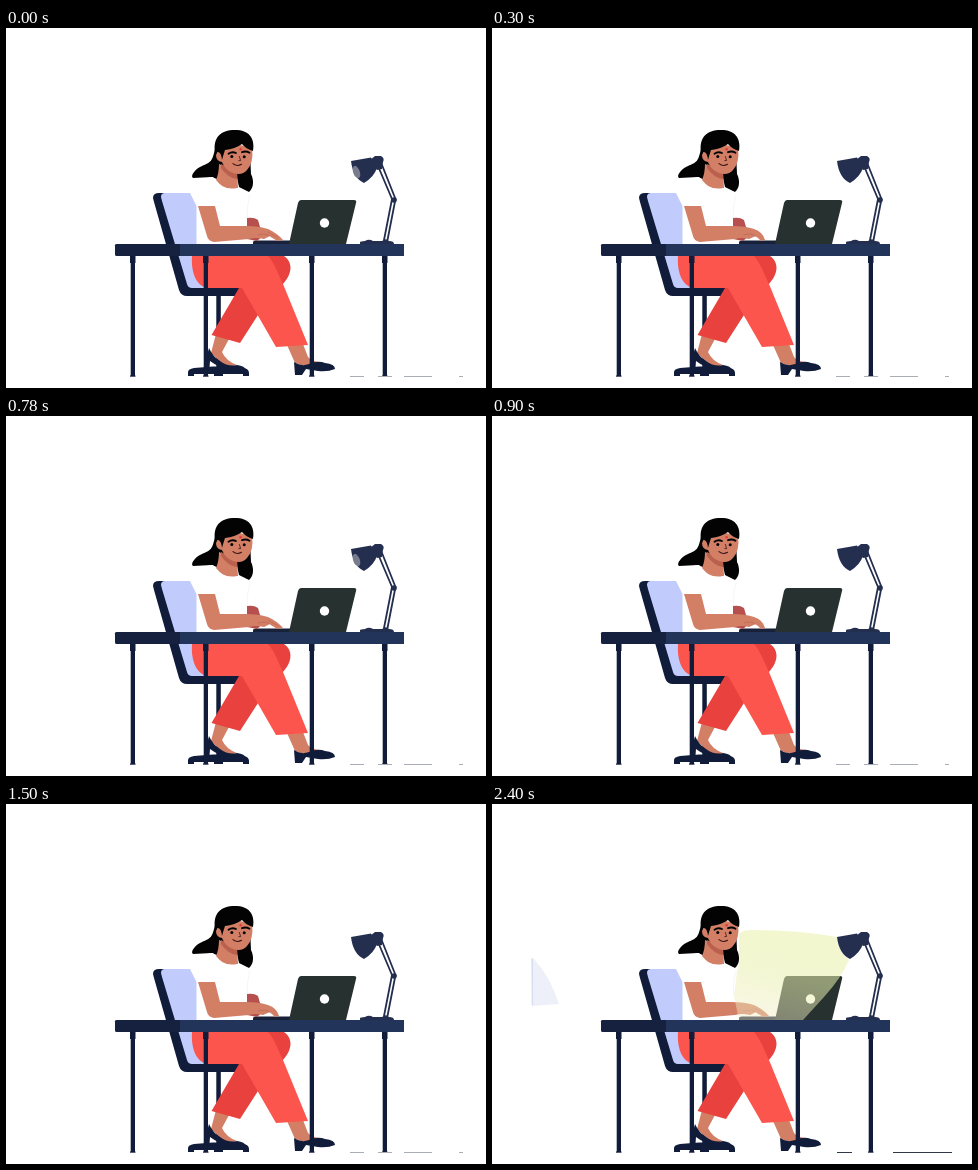
Write an HTML page with a canvas that moves like this. It is 480x360 px and loops after 2800 ms.

```html
<!DOCTYPE html>
<html lang="en">
<head>
<meta charset="utf-8">
<title>Working at a desk</title>
<style>
html, body { margin: 0; width: 100%; height: 100%; overflow: hidden; background: #fff; }
canvas { display: block; width: 480px; height: 360px; }
</style>
</head>
<body>
<canvas id="stage" width="480" height="360"></canvas>
<script>
const ctx = document.getElementById('stage').getContext('2d');
const LOOP = 2800, STEP = 300, LAMP_ON = 1800;
const navy = '#101c39', steel = '#242f50', skin = '#d37f66', shade = '#b9604f', black = '#030304';

function fill(path, color) {
  ctx.fillStyle = color;
  ctx.fill(new Path2D(path));
}

function line(path, color, width) {
  ctx.strokeStyle = color;
  ctx.lineWidth = width;
  ctx.lineCap = ctx.lineJoin = 'round';
  ctx.stroke(new Path2D(path));
}

function dot(x, y, r, color) {
  ctx.fillStyle = color;
  ctx.beginPath();
  ctx.arc(x, y, r, 0, Math.PI * 2);
  ctx.fill();
}

function box(x, y, w, h, color) {
  ctx.fillStyle = color;
  ctx.fillRect(x, y, w, h);
}

function gradient(x0, y0, x1, y1, ...colors) {
  const g = ctx.createLinearGradient(x0, y0, x1, y1);
  colors.forEach((c, i) => g.addColorStop(i / (colors.length - 1), c));
  return g;
}

function chair() {
  fill('M147 170Q147 165 153 165H186V228H187L192 260H240V268H181Q175 268 173 262L148 174Z', navy);
  fill('M155 169Q155 165 159 165H192V228L200 260H186Q182 260 181 256L156 173Z', '#c1ccfd');
  box(210.3, 268, 4.5, 72, navy);
  fill('M182 348V344Q182 341 188 340L207 338.5H218L238 340Q243 341 243 345V348H237V346H217V348H208V346H188V348Z', navy);
}

function legs() {
  fill('M210 306L223 311L216 324Q220 333 231 337L221 340L205 325Z', skin);
  fill('M281 317L297 316L302 329Q305 333 313 334L302 339L289 335Z', skin);
  fill('M255 228H278C287 234 287 246 276 257L252 287L234 315L205.5 307L233 260Z', '#e9413d');
  fill('M186 228H262C269 236 272 246 277 256L302 317L270 319L236 260H202C189 258 185 242 186 228Z', '#fb554d');
  fill('M203 320Q207 329 214 333Q222 339 231 337Q239 338 240 342H223Q212 339 204 333L203 346H201Q200 328 203 320Z', navy);
  fill('M288 334Q295 339 303 336Q312 332 319 335Q329 336 329 341Q322 344 312 343L300 341L296 347H289Z', navy);
}

function head() {
  fill('M209 121C206 134 205 134 196 138C189 141 184 148 187 150L206 149L213 152L231 150L233 159L243 164C248 160 248 152 245 146L244 124Z', black);
  fill('M213 136L231 143L232 160Q221 166 210 152Q213 145 213 136Z', skin);
  fill('M215 136L231 144L231 151Q222 150 215 140Z', shade);
  fill('M211 125Q213 117 230 116L246 120Q248 134 241 142Q236 148 227 145Q219 142 216 134Q210 133 210 127Z', skin);
  fill('M209 124C207 110 214 102 229 102C243 102 249 110 247 123Q240 121 236 116Q229 121 219 122Q217 128 216 132Q215 123 211 124Z', black);
  line('M222.5 125.8Q226 123.2 230 125M236 124.2Q240 122.6 243.5 124.8', black, 1.8);
  dot(225.8, 128.6, 1.5, black);
  dot(238.2, 128.8, 1.5, black);
  line('M233.4 128.5L234.6 132.6H232.8', '#3a1718', 0.8);
  line('M227 135.6Q231 139 235.5 136.3', '#3a1718', 1.2);
  dot(234.6, 121.2, 1.3, '#e8393b');
}

function torso() {
  fill('M187 150Q198 151 207 149Q216 163 231 160L242 164L245 168Q240 181 242 192L245 216H190.5V178L184 165Q181 152 187 150Z', '#fff');
  line('M244 167Q240 180 242 191', '#f2f2f4', 0.7);
}

function arms(reach, lit) {
  if (!lit) fill('M241 190Q248 189 252 192L254 199L258 207L251 213L241 211Z', '#b64f4e');
  const hand = reach
    ? 'H239Q253 198 262 201Q271 205 277 212L271 213L264 208L258 211'
    : 'H239Q254 198 262 201Q271 204 273 212L269 213L264 208L257 211';
  fill('M192 178H209L214 198' + hand + 'Q250 209 243 211L208 214Q202 213 201 208Z', skin);
  line(reach ? 'M252 207Q260 204 267 210M262 204L272 210' : 'M252 207Q259 204 265 209', shade, 0.6);
}

function laptop() {
  fill('M247 214.5Q247 212.5 250 212.5H284V216H247Z', '#172139');
  fill('M295 172H348Q351 172 350 175L340 216H283L292 175Q293 172 295 172Z', '#263130');
  dot(318.5, 195, 4.7, '#fff');
}

function desk() {
  for (const x of [124, 197, 303, 376]) {
    box(x, 228, 5.5, 7, navy);
    box(x + 0.7, 235, 4.3, 113, navy);
    box(x, 347.5, 5.5, 1.2, navy);
  }
  fill('M109 217.5Q109 216 111 216H398V228H111Q109 228 109 226Z', '#22345a');
  fill('M109 217.5Q109 216 111 216H174V228H111Q109 228 109 226Z', '#15213f');
}

function lamp(open) {
  line('M372 138L386 171L378 212M376 137L389.5 171L381.5 212', steel, 1.8);
  dot(388, 172, 2.8, steel);
  fill('M354 216V214.5Q354 213 359 213Q363 210.5 367 213H376Q380 209.5 383 213Q388 213 388 216Z', steel);
  fill('M345 133L365 129.5L371 140Q368 149 358 155Q347 150 345 133Z', steel);
  fill('M364 132L369 128H375Q379 130 377 134L376 141L371 142Z', steel);
  if (open) {
    ctx.save();
    ctx.translate(350.5, 144);
    ctx.rotate(-0.35);
    ctx.fillStyle = '#777b8c';
    ctx.beginPath();
    ctx.ellipse(0, 0, 3.3, 6.5, 0, 0, Math.PI * 2);
    ctx.fill();
    ctx.restore();
  }
}

function light() {
  fill('M247 130Q250 126 260 126Q307 126 345 133Q346 148 357 156Q350 173 332 193L311 216H247L242 192L245 168L247 160Z',
    gradient(305, 126, 280, 216, 'rgba(232,241,168,.55)', 'rgba(232,240,172,.55)', 'rgba(242,236,196,.45)'));
  fill('M39 154L41 154Q58 172 67 200L40 202Z', '#edf0f9');
  line('M40.3 155V201', '#d4dcee', 1.2);
}

function floor(lit) {
  const marks = lit
    ? [[345, 15], [401, 59]]
    : [[344, 14], [372, 14], [398, 28], [453, 4]];
  for (const [x, w] of marks) box(x, 348, w, 1, lit ? '#303747' : '#a9adb6');
}

function draw(t) {
  const lit = t >= LAMP_ON;
  const reach = lit || Math.floor(t / STEP) % 2 === 0;
  box(0, 0, 480, 360, '#fff');
  chair();
  legs();
  head();
  torso();
  laptop();
  arms(reach, lit);
  desk();
  if (lit) light();
  lamp(reach && !lit);
  floor(lit);
}

const start = performance.now();
function tick() {
  draw((performance.now() - start) % LOOP);
  requestAnimationFrame(tick);
}
tick();
</script>
</body>
</html>
```
